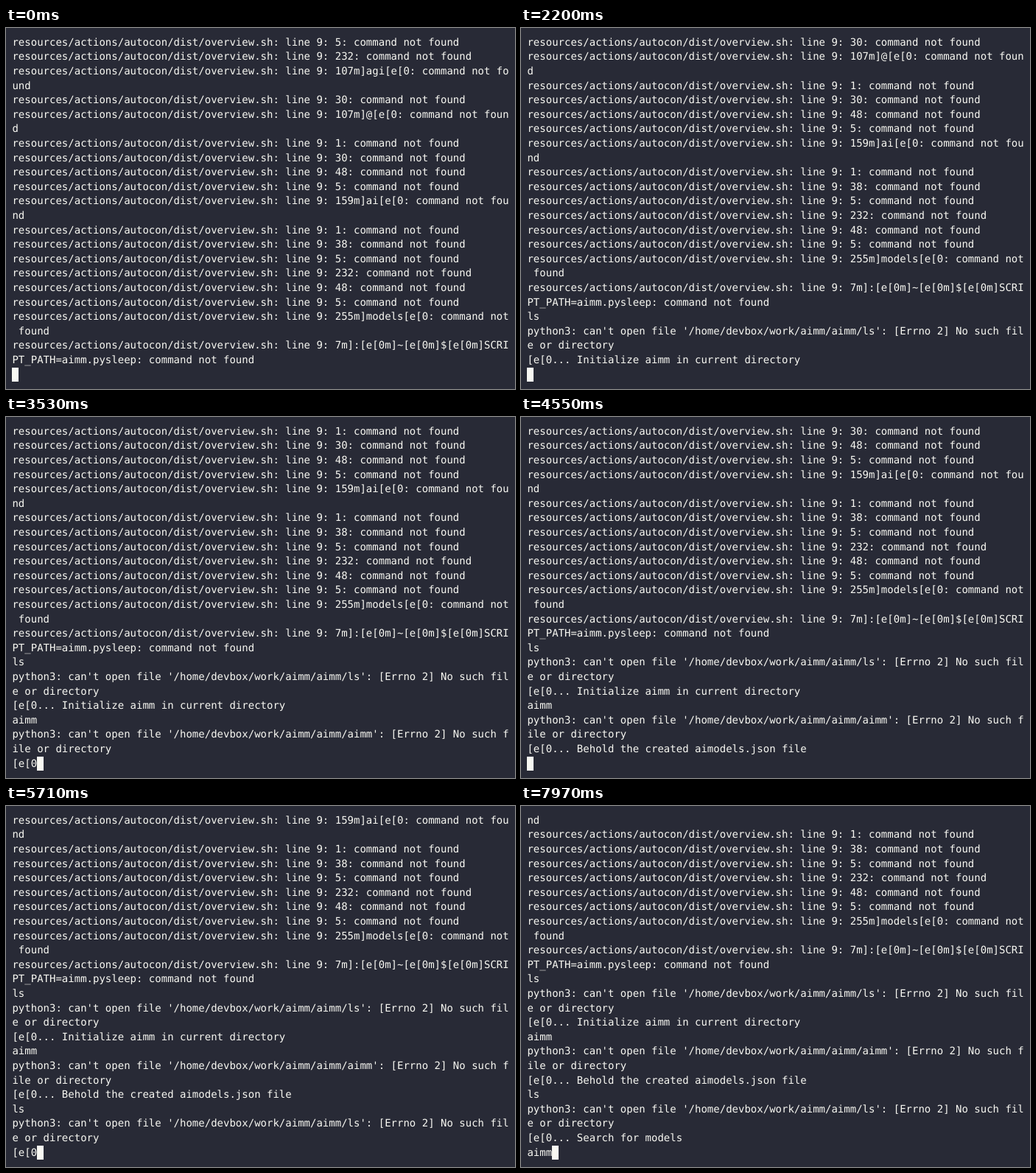
An HTML page that plays this animation: 691 px wide and 490 px high, repeating every 8000 ms.

```html
<!DOCTYPE html>
<html lang="en">
<head>
<meta charset="utf-8">
<title>Terminal session</title>
<style>
  html, body {
    margin: 0;
    width: 100%;
    height: 100%;
    overflow: hidden;
    background: #282a36;
  }
  #term {
    position: absolute;
    left: 0;
    top: 0;
    fill: #f8f8f2;
    font: 14px "DejaVu Sans Mono", monospace;
    font-variant-ligatures: none;
    text-rendering: geometricPrecision;
  }
  #term text {
    white-space: pre;
  }
</style>
</head>
<body>
<svg id="term" width="691" height="490"><rect id="cursor"/></svg>
<script>
const COLS = 80, ROWS = 24, LOOP = 8000;
const FONT = 14, CELL_W = 8.428, CELL_H = 19.6;

const fail = word =>
  `resources/actions/autocon/dist/overview.sh: line 9: ${word}: command not found\n`;
const noFile = name =>
  `\npython3: can't open file '/home/devbox/work/aimm/aimm/${name}': ` +
  `[Errno 2] No such file or directory\n[e[0`;

const history = [
  '5', '232', '107m]agi[e[0', '30', '107m]@[e[0', '1', '30', '48', '5',
  '159m]ai[e[0', '1', '38', '5', '232', '48', '5', '255m]models[e[0',
  '7m]:[e[0m]~[e[0m]$[e[0m]SCRIPT_PATH=aimm.pysleep'
].map(fail).join('');

// Each entry appends its text at the given time.
const output = [
  [0, history],
  [1020, 'l'], [1100, 's'], [1180, noFile('ls')],
  [2200, '... Initialize aimm in current directory\n'],
  [3200, 'a'], [3280, 'i'], [3360, 'm'], [3450, 'm'], [3530, noFile('aimm')],
  [4550, '... Behold the created aimodels.json file\n'],
  [5550, 'l'], [5630, 's'], [5710, noFile('ls')],
  [6730, '... Search for models\n'],
  [7730, 'a'], [7810, 'i'], [7890, 'm'], [7970, 'm']
];

const cellX = col => CELL_W * (col + 1);
const cellY = row => CELL_H * (row + 0.5);

const term = document.getElementById('term');
const cursor = document.getElementById('cursor');
const rows = Array.from({ length: ROWS }, (_, i) => {
  const row = document.createElementNS('http://www.w3.org/2000/svg', 'text');
  row.setAttribute('x', cellX(0));
  row.setAttribute('y', Math.round(cellY(i) + FONT));
  return term.appendChild(row);
});

function wrap(text) {
  const lines = [];
  for (const line of text.split('\n')) {
    let at = 0;
    do {
      lines.push(line.slice(at, at + COLS));
      at += COLS;
    } while (at < line.length);
  }
  return lines;
}

function placeCursor(col, row) {
  const x = Math.round(cellX(col)), y = Math.round(cellY(row));
  cursor.setAttribute('x', x);
  cursor.setAttribute('y', y);
  cursor.setAttribute('width', Math.round(cellX(col + 1)) - x);
  cursor.setAttribute('height', Math.round(cellY(row + 1)) - y);
}

let shown = -1;

function draw(time) {
  const count = output.filter(([start]) => start <= time).length;
  if (count === shown) return;
  shown = count;
  const text = output.slice(0, count).map(entry => entry[1]).join('');
  const view = wrap(text).slice(-ROWS);
  rows.forEach((row, i) => { row.textContent = view[i] || ''; });
  placeCursor(view[view.length - 1].length, view.length - 1);
}

const begin = performance.now();

function tick() {
  draw((performance.now() - begin) % LOOP);
  requestAnimationFrame(tick);
}
tick();
</script>
</body>
</html>
```
